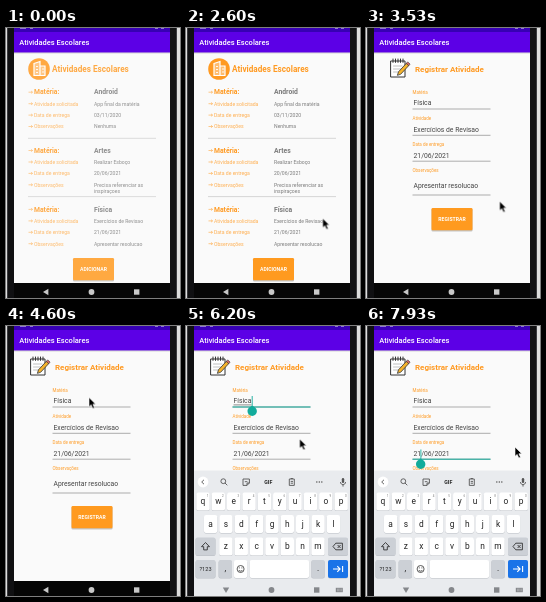
An HTML page for the animation above (8 s loop, 174 px wide and 270 px high).

```html
<!DOCTYPE html>
<html lang="pt">
<head>
<meta charset="utf-8">
<title>Atividades Escolares</title>
<style>
html, body { margin: 0; width: 100%; height: 100%; overflow: hidden; background: #ddd; }
svg { display: block; width: 100vw; height: 100vh; }
text { font-family: Roboto, "Open Sans", sans-serif; }
.bar { font-size: 7.5px; font-weight: 500; fill: #fff; }
.head { font-size: 8.2px; font-weight: 700; fill: #ff9a22; }
.name { font-size: 6.8px; font-weight: 700; }
.small { font-size: 5.1px; }
.orange { fill: #ff9a22; }
.soft { fill: #ffad4d; }
.grey { fill: #7a7a7a; }
.label { font-size: 4.5px; fill: #ff9a22; }
.value { font-size: 6.8px; fill: #444; }
.button { font-size: 5.1px; font-weight: 700; fill: #fff; text-anchor: middle; }
.key { font-size: 8.4px; fill: #222; text-anchor: middle; }
.hint { font-size: 3px; fill: #777; text-anchor: middle; }

/* 1% = 80 ms */
.list, .rows, .form, .board, .pointer { animation: 8s linear infinite; }
.step { animation: 8s step-end infinite; }
.list { animation-name: list; transform-origin: 86px 135px; }
.rows { animation-name: rows; }
.form { animation-name: form; transform-origin: 86px 135px; }
.board { animation-name: board; }
.pointer { animation-name: pointer; }
.focusA { animation-name: focusA; }
.caretA { animation-name: caretA; }
.handleA { animation-name: handleA; }
.composeA { animation-name: composeA; }
.focusB { animation-name: focusB; }
.caretB { animation-name: caretB; }
.navPlain { animation-name: navPlain; }
.navKeys { animation-name: navKeys; }

@keyframes rows { 0%, .87% { opacity: .85 } 3.375%, 100% { opacity: 1 } }
@keyframes list {
  0%, 35.8% { transform: scale(1); animation-timing-function: cubic-bezier(.05,.7,.1,1) }
  40.875%, 100% { transform: scale(1.1) }
}
@keyframes form {
  0%, 35.8% { transform: scale(.85); opacity: 0 }
  36.5% { transform: scale(.935); opacity: 1 }
  37.5% { transform: scale(.975); animation-timing-function: ease-out }
  40.875%, 100% { transform: scale(1); opacity: 1 }
}
@keyframes board {
  0%, 68.375% { transform: translateY(127px) }
  69.2% { transform: translateY(36px) }
  70% { transform: translateY(8px) }
  70.875%, 100% { transform: translateY(0) }
}
@keyframes pointer {
  0%, 15% { transform: translate(165px, 272px); animation-timing-function: ease-out }
  20.875% { transform: translate(134px, 194px) }
  24.125%, 30.875% { transform: translate(135px, 192px); animation-timing-function: ease-in-out }
  35%, 41.625% { transform: translate(140px, 187px); animation-timing-function: ease-in-out }
  51.625%, 52.5% { transform: translate(91px, 82px); animation-timing-function: ease-out }
  57.5%, 68.375% { transform: translate(83px, 71.5px) }
  70% { transform: translate(91px, 82px); animation-timing-function: ease-out }
  78.375%, 79.125% { transform: translate(114px, 113.5px); animation-timing-function: ease-in-out }
  84.125%, 88.375% { transform: translate(56px, 127px); animation-timing-function: ease-in-out }
  93.375%, 100% { transform: translate(149px, 121px) }
}
@keyframes focusA { 0% { opacity: 0 } 60.875% { opacity: 1 } 86.625%, 100% { opacity: 0 } }
@keyframes handleA { 0% { opacity: 0 } 64.125% { opacity: 1 } 86.625%, 100% { opacity: 0 } }
@keyframes composeA { 0% { opacity: 0 } 69.2% { opacity: 1 } 86.625%, 100% { opacity: 0 } }
@keyframes caretA {
  0% { opacity: 0 } 61.625% { opacity: 1 } 70.375% { opacity: 0 }
  76.625% { opacity: 1 } 82.875%, 100% { opacity: 0 }
}
@keyframes focusB { 0% { opacity: 0 } 86.625%, 100% { opacity: 1 } }
@keyframes caretB { 0% { opacity: 0 } 86.625% { opacity: 1 } 92.875% { opacity: 0 } 99.125%, 100% { opacity: 1 } }
@keyframes navPlain { 0% { opacity: 1 } 66.625%, 100% { opacity: 0 } }
@keyframes navKeys { 0% { opacity: 0 } 66.625%, 100% { opacity: 1 } }
</style>
</head>
<body>
<svg viewBox="0 0 174 270" preserveAspectRatio="none">
  <defs>
    <clipPath id="screen"><path d="M8 0H164V255H8z"/></clipPath>
    <clipPath id="panel"><path d="M8 0H164V270H8z"/></clipPath>
    <g id="appbar">
      <path d="M8-5H164V260H8z" fill="#fafafa"/>
      <path d="M8-5H164V4H8z" fill="#3700b3"/>
      <path d="M8 4H164V24.5H8z" fill="#5c00e6"/>
      <path d="M8 24.5H164V25.4H8z" fill="#000" opacity=".15"/>
      <path d="M14 0h6M24 0h3M149 0h3M155 0h3" stroke="#fff" stroke-width="1.6" opacity=".6"/>
      <text class="bar" x="13.3" y="16.8">Atividades Escolares</text>
    </g>
    <path id="drop" d="M0 0C1.6 1.6 4.7 2.6 4.7 6A4.7 4.7 0 0 1-4.7 6C-4.7 2.6-1.6 1.6 0 0z" fill="#12ab9b"/>
  </defs>

  <path d="M1 0H171V270H1z" fill="#101012"/>
  <path d="M1.5 0V270M170.5 0V270" stroke="#3a3a3e"/>

  <g clip-path="url(#screen)">
    <g class="list">
      <use href="#appbar"/>
      <g class="rows">
        <circle cx="33" cy="41" r="10.8" fill="#ff9a22"/>
        <g fill="none" stroke="#fff" stroke-width="1.2">
          <path d="M28 35.5l6-2v14h-6zM34 38h5v9.5h-5" fill="#fff" fill-opacity=".35"/>
          <path d="M30 38.5h2M30 41.5h2M30 44.5h2M36 41h2M36 44h2" stroke-width=".9"/>
        </g>
        <text class="head" x="46" y="44.2">Atividades Escolares</text>
        <g id="tasks"></g>
        <rect x="67" y="231" width="41" height="22.5" rx="1.2" opacity=".22"/>
        <rect x="67" y="230" width="41" height="22.3" rx="1.2" fill="#ff9a1f"/>
        <text class="button" x="87.5" y="243">ADICIONAR</text>
      </g>
    </g>

    <g class="form">
      <use href="#appbar"/>
      <g stroke="#333" stroke-linecap="round" stroke-linejoin="round">
        <path d="M25 33H39V49H25z" fill="#fff" stroke-width="1"/>
        <path d="M27 31v3.4M29.5 31v3.4M32 31v3.4M34.5 31v3.4M37 31v3.4" stroke-width="1"/>
        <path d="M27.5 38h8.5M27.5 41h7M27.5 44h5" stroke="#999" stroke-width=".6"/>
        <path d="M31.5 47l1-3.2 8-8.6 2.4 2.2-8 8.6z" fill="#f5b32c" stroke-width=".8"/>
        <path d="M40.5 35.2l1.2-1.3 2.4 2.2-1.2 1.3z" fill="#d66" stroke-width=".6"/>
      </g>
      <text class="head" x="49" y="44" style="font-size:8px">Registrar Atividade</text>
      <g id="fields"></g>
      <rect x="65.5" y="181" width="41" height="22.5" rx="1.2" opacity=".22"/>
      <rect x="65.5" y="180" width="41" height="22.3" rx="1.2" fill="#ff9a1f"/>
      <text class="button" x="86" y="193">REGISTRAR</text>
      <g stroke="#12ab9b">
        <path class="step focusA" d="M46.5 81H124.5" stroke-width="1"/>
        <path class="step caretA" d="M66.2 70V79.5" stroke-width=".9"/>
        <path class="step focusB" d="M46.5 133.2H124.5" stroke-width="1"/>
        <path class="step caretB" d="M54.9 123.5V132.5" stroke-width=".9"/>
      </g>
      <path class="step composeA" d="M47.5 78.9H65.5" stroke="#444" stroke-width=".6"/>
    </g>
  </g>

  <g clip-path="url(#panel)">
    <path d="M8 255H164V270H8z" fill="#060606"/>
    <g class="step handleA"><use href="#drop" x="66.2" y="79.3"/></g>
    <g class="step focusB"><use href="#drop" x="54.7" y="132.3"/></g>
    <g class="board" id="board">
      <path d="M8 144.5H164V275H8z" fill="#e9ebee"/>
      <circle cx="17" cy="156" r="5.4" fill="#fff"/>
      <g fill="none" stroke="#555" stroke-width=".9">
        <path d="M18 153.8l-2.3 2.2 2.3 2.2"/>
        <circle cx="37.3" cy="155.2" r="2.4"/><path d="M39 157l2.3 2.3"/>
        <path d="M57 153h6.4v4l-2.4 2.4h-4zM61 159.4v-2.4h2.4M58.8 155.7h2.6"/>
        <path d="M103.3 153h5v6.4h-5zM104.7 152.5h2.2M104.7 155.4h2.3M104.7 157.2h2.3"/>
        <path d="M154.5 156c0 3.5 5 3.5 5 0M157 158.6v2"/>
      </g>
      <text class="key" x="82.3" y="158" style="font-size:5.3px;font-weight:700">GIF</text>
      <g fill="#555">
        <circle cx="130.8" cy="156" r=".75"/><circle cx="133.3" cy="156" r=".75"/><circle cx="135.8" cy="156" r=".75"/>
        <rect x="155.8" y="152" width="2.4" height="5" rx="1.2"/>
      </g>
    </g>
    <g class="step navPlain" fill="#c8c8c8">
      <path d="M37 264l5.4-3.2v6.4z"/><circle cx="85.5" cy="264" r="2.9"/><path d="M128 261.3h5.4v5.4H128z"/>
    </g>
    <g class="step navKeys" fill="#85878b">
      <path d="M40 267l-3.2-5.4h6.4z"/><circle cx="85.5" cy="264" r="2.9"/><path d="M128 261.3h5.4v5.4H128z"/>
      <path d="M149.8 261.8h7v4.4h-7z"/>
      <path d="M151 263.2h4.8M151 264.8h4.8" stroke="#e9ebee" stroke-width=".6" stroke-dasharray=".8 .5"/>
    </g>
  </g>

  <path class="pointer" d="M0 0V9.3L2.2 7.4 3.8 11 5.5 10.2 3.9 6.8H6.8z" fill="#000" stroke="#fff" stroke-width=".6"/>
</svg>
<script>
const add = (id, markup) => document.getElementById(id).insertAdjacentHTML('beforeend', markup);
const text = (cls, x, y, s) => `<text class="${cls}" x="${x}" y="${y}">${s}</text>`;
const arrow = y => `<path d="M22.5 ${y}h4m-1.4-1.2l1.4 1.2-1.4 1.2" fill="none" stroke="#ffa63d" stroke-width=".6"/>`;

const tasks = [
  [64, 'Android', 'App final da matéria', '03/11/2020', 'Nenhuma'],
  [122.3, 'Artes', 'Realizar Esboço', '20/06/2021', 'Precisa referenciar as', 'inspiraçoes'],
  [181.2, 'Física', 'Exercícios de Revisao', '21/06/2021', 'Apresentar resolucao']
];
const captions = ['Atividade solicitada', 'Data de entrega', 'Observações'];
tasks.forEach(([y, name, ...values], i) => {
  let out = arrow(y + .2) + text('name orange', 28, y + 2.4, 'Matéria:') + text('name grey', 88, y + 2.4, name);
  captions.forEach((c, n) => {
    const line = y + 11.7 + n * 11.4;
    out += arrow(line) + text('small soft', 28, line + 1.8, c) + text('small grey', 88, line + 1.8, values[n]);
  });
  if (values[3]) out += text('small grey', 88, y + 42.4, values[3]);
  if (i < 2) out += `<path d="M22 ${y + 46.3}H150" stroke="#d2d2d2" stroke-width=".9"/>`;
  add('tasks', out);
});

[
  ['Matéria', 65.6, 'Física', 77.4, 81],
  ['Atividade', 92.2, 'Exercícios de Revisao', 104.4, 107.3],
  ['Data de entrega', 118.4, '21/06/2021', 130.4, 133.2],
  ['Observações', 144, 'Apresentar resolucao', 160.4, 167]
].forEach(([label, ly, value, vy, line]) => add('fields',
  text('label', 46.5, ly, label) + text('value', 47.5, vy, value) +
  `<path d="M46.5 ${line}H124.5" stroke="#8c8c8c" stroke-width=".7"/>`));

const cap = (x, y, w, fill = '#fff') =>
  `<rect x="${x - w / 2}" y="${y - 8.4}" width="${w}" height="18" rx="2" fill="#b9bdc3"/>` +
  `<rect x="${x - w / 2}" y="${y - 9}" width="${w}" height="18" rx="2" fill="${fill}"/>`;
const pitch = 15.35, dark = '#ccd0d6';
[['qwertyuiop', 17, 175.5], ['asdfghjkl', 24.6, 198], ['zxcvbnm', 39.9, 220.5]].forEach(([keys, x0, y], row) =>
  [...keys].forEach((k, i) => {
    const x = x0 + i * pitch;
    add('board', cap(x, y, 13.4) + text('key', x, y + 2.9, k) +
      (row ? '' : text('hint', x + 4.6, y - 5, (i + 1) % 10)));
  }));

add('board',
  cap(19.5, 220.5, 20, dark) + cap(152, 220.5, 20, dark) +
  `<g fill="none" stroke="#333" stroke-width=".9">
    <path d="M19.5 216.5l-4 4.2h2.2v3.2h3.6v-3.2h2.2z"/>
    <path d="M147 220.5l2.8-3.3h6.6v6.6h-6.6zM151.6 219l3 3m0-3l-3 3"/></g>` +
  cap(19.5, 243, 20, dark) + `<text class="key" x="19.5" y="245.1" style="font-size:5.6px">?123</text>` +
  cap(39.3, 243, 13.4, dark) + text('key', 39.3, 245.4, ',') +
  cap(54.6, 243, 13.4) +
  `<g fill="none" stroke="#333" stroke-width=".8"><circle cx="54.6" cy="243" r="3.5"/>
    <path d="M52.8 244c.8 1.6 2.8 1.6 3.6 0M53.3 241.4v1M55.9 241.4v1"/></g>` +
  cap(93.4, 243, 59.5) +
  cap(132, 243, 13.4, dark) + text('key', 132, 245.4, '.') +
  cap(152, 243, 20, '#1a73e8') +
  `<path d="M147 243h7m-2.7-2.8l2.8 2.8-2.8 2.8M156.6 240v6" fill="none" stroke="#fff" stroke-width="1.1"/>`);
</script>
</body>
</html>
```
